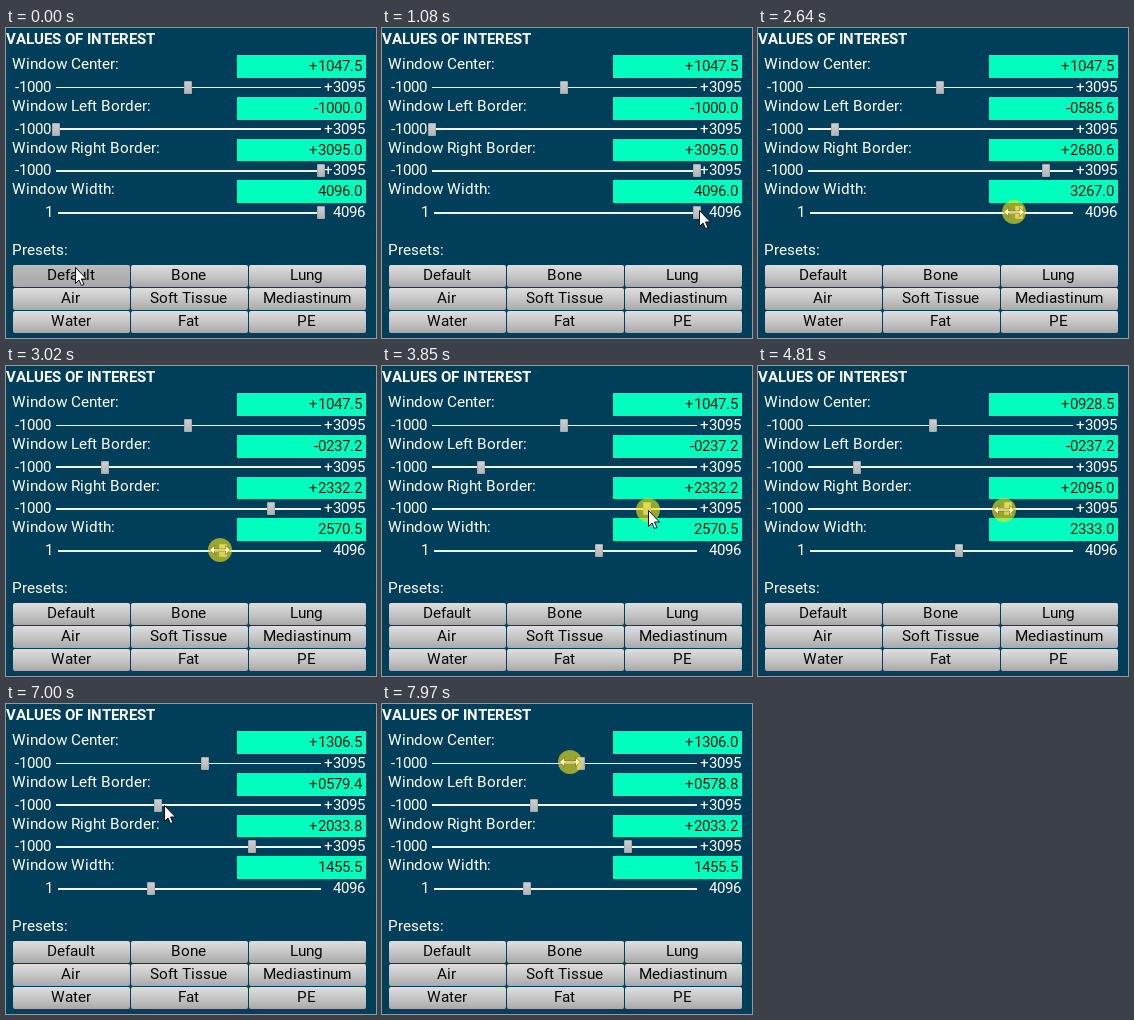
Recreate the animation shown at these times as an HTML page with a canvas. Size 370 by 310 pixels, loop 8 s.

```html
<!DOCTYPE html>
<html lang="en">
<head>
<meta charset="utf-8">
<title>Values of interest</title>
<style>
html, body { margin: 0; width: 100%; height: 100%; overflow: hidden; background: #003e5a; }
canvas { display: block; }
</style>
</head>
<body>
<canvas id="stage" width="370" height="310"></canvas>
<script>
const ctx = document.getElementById('stage').getContext('2d');
const LOOP = 8000;
const HANDLE_LAG = 20;
const VALUE_DELAY = 130;
const FIRST_STEP = 0.002;
const LABEL = '15.3px Roboto, sans-serif';
const NUMBER = '15px Roboto, sans-serif';
const TITLE = 'bold 15px Roboto, sans-serif';

const smooth = u => u * u * (3 - 2 * u);
const easeOut = u => 1 - (1 - u) ** 2;
const progress = (t, start, end) => Math.min(1, Math.max(0, (t - start) / (end - start)));

// Each drag applies its change to the window borders; the rest follows from them.
const drags = [
  { press: 1380, grab: 1550, start: 2220, end: 3016, release: 3150, x: 214, y: 184,
    apply(v, p) { v.left += 762.8 * p; v.right -= 762.8 * p; } },
  { press: 3850, grab: 4010, start: 4310, end: 5017, release: 5020, x: 242, y: 144,
    apply(v, p) { v.right -= 298.4 * p; } },
  { press: 5840, grab: 6040, start: 6455, end: 6820, release: 6970, x: 157, y: 102,
    apply(v, p) { v.left += 816.6 * p; } },
  { press: 7750, grab: 7820, start: 7830, end: 7990, release: LOOP, x: 188, y: 58,
    apply(v, p) { const shift = p && 0.6; v.left -= shift; v.right -= shift; } }
];

const pointerMoves = [
  { start: 440, end: 900, x: 335, y: 190, ease: smooth },
  { start: 900, end: 1080, x: 317, y: 182, ease: smooth },
  { start: 1080, end: 1210, x: 315, y: 183, ease: smooth },
  { start: 3150, end: 3510, x: 266, y: 144, ease: smooth },
  { start: 5020, end: 5750, x: 102, y: 98, ease: easeOut },
  { start: 6970, end: 7350, x: 208, y: 38, ease: smooth },
  { start: 7350, end: 7600, x: 199, y: 57, ease: smooth },
  ...drags.map(({ start, end, x, y }) =>
    ({ start: start - HANDLE_LAG, end: end - HANDLE_LAG, x, y, ease: smooth }))
].sort((a, b) => a.start - b.start);

const presets = ['Default', 'Bone', 'Lung', 'Air', 'Soft Tissue', 'Mediastinum', 'Water', 'Fat', 'PE'];

function pointerAt(t) {
  let x = 69, y = 239;
  for (const move of pointerMoves) {
    const p = move.ease(progress(t, move.start, move.end));
    x += (move.x - x) * p;
    y += (move.y - y) * p;
  }
  return [Math.round(x), Math.round(y)];
}

function valuesAt(t) {
  const v = { left: -1000, right: 3095 };
  for (const drag of drags) {
    const begun = t >= drag.grab + VALUE_DELAY;
    drag.apply(v, begun ? Math.max(FIRST_STEP, smooth(progress(t, drag.start, drag.end))) : 0);
  }
  v.center = Math.floor(v.left + v.right + 1e-6) / 2;
  v.width = Math.round((v.right - v.left + 1) * 2) / 2;
  return v;
}

// Glyphs advance by whole pixels, as in the toolkit's hinted text.
function text(str, x, y, { font = LABEL, color = '#fff', align = 0 } = {}) {
  ctx.font = font;
  ctx.fillStyle = color;
  const advances = [...str].map(c => Math.round(ctx.measureText(c).width));
  const total = advances.reduce((sum, w) => sum + w, 0);
  let pen = Math.floor(x - total * align);
  [...str].forEach((c, i) => {
    ctx.fillText(c, pen, y);
    pen += advances[i];
  });
}

function rect(x, y, w, h, color) {
  ctx.fillStyle = color;
  ctx.fillRect(x, y, w, h);
}

function roundRect(x, y, w, h, radius, color) {
  ctx.beginPath();
  ctx.roundRect(x, y, w, h, radius);
  ctx.fillStyle = color;
  ctx.fill();
}

function gradient(y, h, ...colors) {
  const g = ctx.createLinearGradient(0, y, 0, y + h);
  colors.forEach((color, i) => g.addColorStop(i / (colors.length - 1), color));
  return g;
}

const padded = v => Math.abs(v).toFixed(1).padStart(6, '0');
const signed = v => (v < 0 ? '-' : '+') + padded(v);

function slider(row, name, value, label, { min = -1000, max = 3095, start = 50, minText = '-1000', maxText = '+3095' } = {}) {
  const y = 59 + row * 41.7, mid = Math.round(y);
  const top = Math.round(y - 31.7), bottom = Math.round(y - 9.2);
  text(name, 6, Math.round(y - 17.8));
  rect(231, top, 129, bottom - top, '#00ffbe');
  text(label, 356, Math.round(y - 15.7), { font: NUMBER, color: '#001a14', align: 1 });
  text(minText, start - 5, mid + 5, { font: NUMBER, align: 1 });
  text(maxText, 359, mid + 5, { font: NUMBER, align: 1 });
  rect(start, Math.floor(y), 315 - start, row ? 2 : 1, '#f0f5f6');
  const x = Math.round(start + (value - min) / (max - min) * (314.5 - start));
  roundRect(x - 4, mid - 6, 8, 13, 1, '#a3abae');
  rect(x - 3, mid - 5, 6, 11, gradient(mid - 5, 11, '#cfcfcf', '#b4b4b4'));
}

function button(name, i, pressed) {
  const x = 7 + i % 3 * 118, y = 237 + Math.floor(i / 3) * 23;
  roundRect(x, y, 117, 22, 2, pressed
    ? gradient(y, 22, '#bcbcbc', '#b0b0b0', '#a8a8a8')
    : gradient(y, 22, '#dedede', '#c6c6c6', '#a9a9a9'));
  text(name, x + 58, y + 15, { color: '#080808', align: 0.5 });
}

const arrow = [[0.5, 0.5], [0.5, 16.5], [4, 13], [6.5, 18.5], [9, 17.5], [6.5, 12], [11.5, 12]];
const arrowHalf = [[-10.5, 0], [-5.5, -4.5], [-5.5, -1], [5.5, -1], [5.5, -4.5]];
const resize = [...arrowHalf, ...arrowHalf.map(([x, y]) => [-x, -y])];

function pointer(t) {
  const [x, y] = pointerAt(t);
  const drag = drags.find(d => t >= d.press && t < d.release);
  const dragging = drag && t >= drag.grab;
  if (drag) roundRect(x - 12, y - 12, 24, 24, 12, 'rgba(240, 225, 25, 0.63)');
  ctx.beginPath();
  for (const [px, py] of dragging ? resize : arrow) ctx.lineTo(x + px, y + py);
  ctx.closePath();
  ctx.lineJoin = 'round';
  ctx.strokeStyle = dragging ? 'rgba(90, 85, 20, 0.5)' : '#111';
  ctx.fillStyle = dragging ? '#fff9b4' : '#fff';
  ctx.fill();
  ctx.stroke();
}

function draw(t) {
  const { left, right, center, width } = valuesAt(t);
  rect(0, 0, 370, 310, '#003e5a');
  text('VALUES OF INTEREST', 0, 16, { font: TITLE });
  slider(0, 'Window Center:', center, signed(center));
  slider(1, 'Window Left Border:', left, signed(left));
  slider(2, 'Window Right Border:', right, signed(right));
  slider(3, 'Window Width:', width, padded(width),
    { min: 1, max: 4096, start: 52, minText: '1', maxText: '4096' });
  text('Presets:', 6, 227);
  presets.forEach((name, i) => button(name, i, i === 0 && t < 70));
  pointer(t);
}

const began = performance.now();
function frame() {
  draw((performance.now() - began) % LOOP);
  requestAnimationFrame(frame);
}
frame();
</script>
</body>
</html>
```
